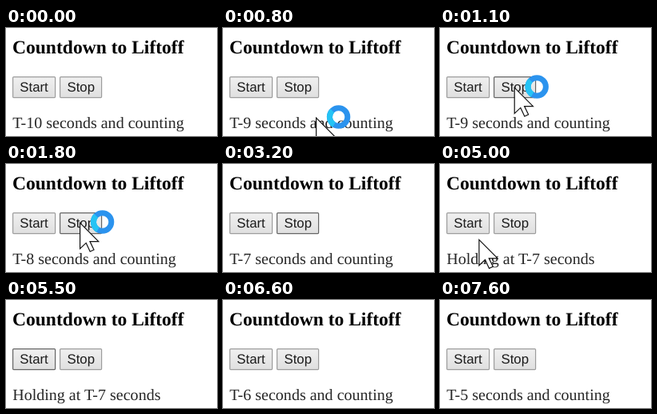
Recreate the animation shown at these times as an HTML page. Size 264 by 136 pixels, loop 8 s.

```html
<!DOCTYPE html>
<html lang="en">
<head>
<meta charset="utf-8">
<title>Countdown to Liftoff</title>
<style>
  html, body { margin: 0; width: 100%; height: 100%; overflow: hidden; background: #fff; }
  svg { display: block; width: 100%; height: 100%; text-rendering: geometricPrecision; }
  .serif { font-family: "Liberation Serif", "Times New Roman", serif; }
  .sans { font: 16.8px "Liberation Sans", Arial, sans-serif; fill: #1c1c1c; }
</style>
</head>
<body>
<svg viewBox="0 0 264 136">
  <defs>
    <linearGradient id="up" x2="0" y2="1">
      <stop stop-color="#f0f0f0"/><stop offset="1" stop-color="#dfdfdf"/>
    </linearGradient>
    <linearGradient id="down" x2="0" y2="1">
      <stop stop-color="#e4e4e4"/><stop offset="1" stop-color="#d4d4d4"/>
    </linearGradient>
  </defs>
  <text class="serif" x="8" y="32.4" font-size="23.55" font-weight="bold">Countdown to Liftoff</text>
  <rect id="start" x="8.6" y="61.6" width="53" height="26" rx="1"/>
  <text class="sans" x="17.3" y="80.4">Start</text>
  <rect id="stop" x="67.6" y="61.6" width="52" height="26" rx="1"/>
  <text class="sans" x="76.5" y="80.4">Stop</text>
  <text id="status" class="serif" x="8.2" y="125.7" font-size="20.05" fill="#262626"></text>
  <g id="cursor">
    <path d="M.6 1.2V33.6L8.2 26.4L13.2 37.2L18 35L13 24.6H23.8Z" fill="#fff" stroke="#111" stroke-width="1.2"/>
    <g id="ring" fill="none" stroke-width="7">
      <circle cx="28.6" cy="0" r="11.2" stroke="#2b93ee"/>
      <path d="M23 9.7A11.2 11.2 0 0 1 20.7 -7.9" stroke="#25c3f4"/>
    </g>
  </g>
</svg>
<script>
const LOOP = 8000, STEP = 100;
const $ = id => document.getElementById(id);
const start = $("start"), stop = $("stop"), status = $("status"), cursor = $("cursor"), ring = $("ring");

const clamp = v => Math.max(0, Math.min(1, v));
const mix = (a, b, p) => a + (b - a) * p;

// Pointer tip: rises to Stop, swings below both buttons to Start, then drops away.
function pointer(t) {
  if (t < 800 || t >= 5900) return { x: 30, y: 150 };
  if (t < 4600) {
    const p = 1 - (1 - clamp((t - 800) / 500)) ** 4;
    return { x: mix(116, 92, p), y: mix(112, 73, p) };
  }
  if (t < 5800) {
    const u = clamp((t - 4600) / 600), p = u * u * (3 - 2 * u);
    return { x: mix(92, 33, p), y: mix(79, 74, p) + 26 * Math.sin(Math.PI * p) };
  }
  return { x: 35, y: 101 };
}

function message(t) {
  if (t >= 3500 && t < 6600) return "Holding at T-7 seconds";
  const n = t < 3500 ? 10 - Math.floor((t + 200) / 1000) : t < 7600 ? 6 : 5;
  return `T-${n} seconds and counting`;
}

function paint(button, left, right, tip, pressed) {
  const hover = tip.x >= left && tip.x < right && tip.y >= 61 && tip.y < 88;
  button.setAttribute("fill", pressed ? "url(#down)" : "url(#up)");
  button.setAttribute("stroke", hover ? "#646464" : "#9c9c9c");
  button.setAttribute("stroke-width", 1.2);
}

function draw(time) {
  const t = Math.floor((time % LOOP) / STEP) * STEP;
  const tip = pointer(t);
  const busy = t >= 800 && t < 3200;
  const shown = busy || (t >= 4600 && t < 5500) || t === 5800;
  paint(start, 8, 62, tip, false);
  paint(stop, 67, 120, tip, t === 3400);
  const text = message(t);
  if (status.textContent !== text) status.textContent = text;
  cursor.setAttribute("transform", `translate(${tip.x} ${tip.y})`);
  cursor.setAttribute("visibility", shown ? "visible" : "hidden");
  ring.setAttribute("display", busy ? "inline" : "none");
}

let origin;
function tick(now) {
  origin ??= now;
  draw(now - origin);
  requestAnimationFrame(tick);
}
draw(0);
requestAnimationFrame(tick);
</script>
</body>
</html>
```
